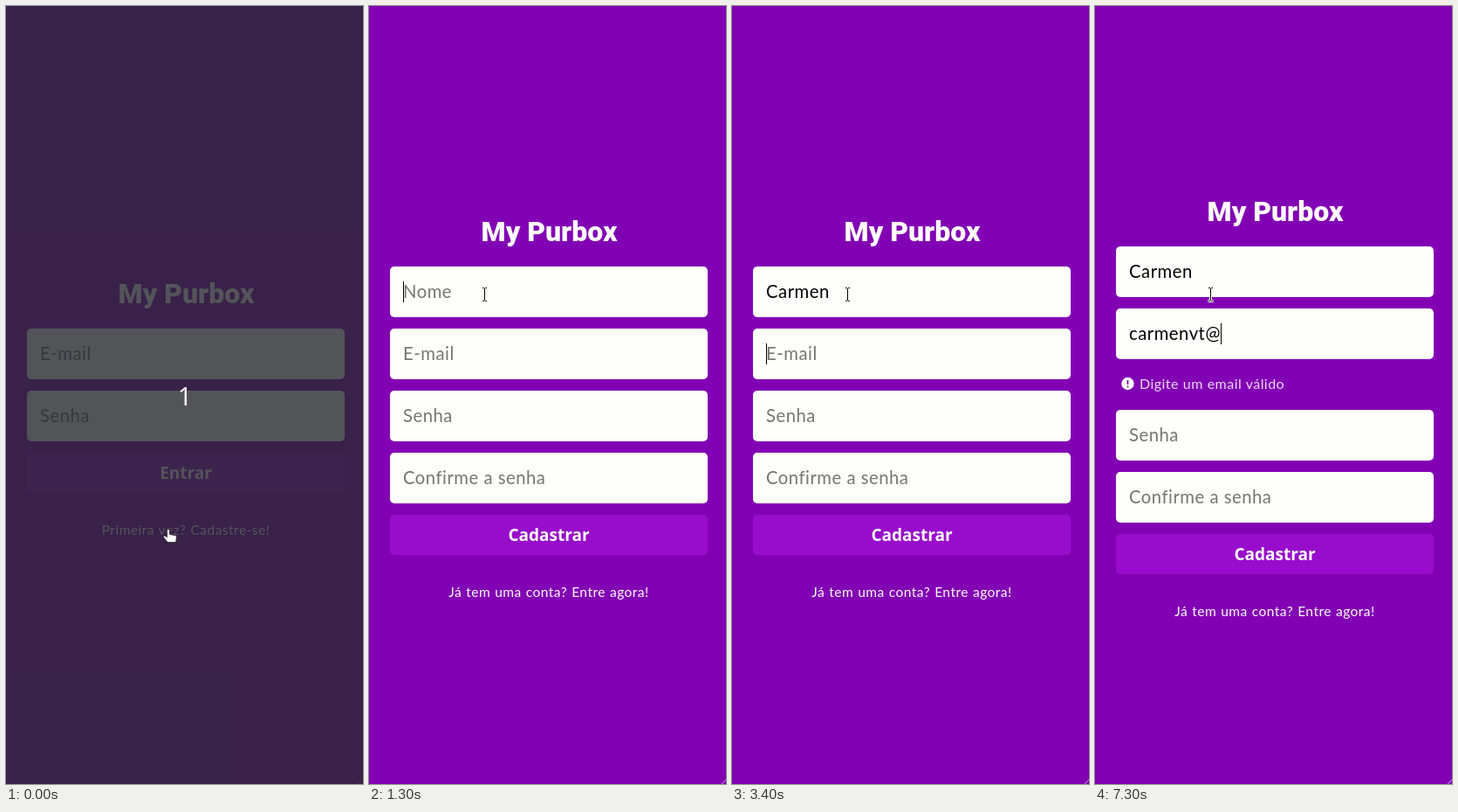
These frames come from a looping animation (409 px wide and 890 px high, 8 s). An HTML page:

```html
<!DOCTYPE html>
<html lang="pt-BR">
<head>
<meta charset="utf-8">
<title>Cadastro</title>
<style>
  html, body { margin: 0; width: 100%; height: 100%; overflow: hidden; background: #8200b4; }
  svg { display: block; width: 100vw; height: 100vh; }
  text { fill: #fff; font-family: Lato, sans-serif; }
  .title { font: 900 32px Roboto, sans-serif; text-anchor: middle; }
  .box { fill: #fefffc; }
  .hint, .typed { font-size: 20.3px; letter-spacing: .5px; }
  .hint { fill: #757575; }
  .typed { fill: #000; }
  .button { fill: #980dcb; }
  .action { font: 700 19px "Noto Sans", sans-serif; text-anchor: middle; }
  .link { font-size: 15.5px; letter-spacing: .48px; word-spacing: .6px; text-anchor: middle; }
  .error { font-size: 16px; letter-spacing: .45px; word-spacing: .4px; fill: #ecdaf4; }
  .count { font: 29px "Noto Sans", sans-serif; text-anchor: middle; fill: #f3edf9; }
  .shade { fill: rgba(39, 42, 48, .8); }
</style>
</head>
<body>
<svg viewBox="0 0 409 890">
  <defs>
    <path id="hand" d="M-.5 6V1.2Q-.5 -.5 1 -.5T2.5 1.2V5.5L9 6.6Q10.6 7 10.4 8.8L9.6 14.5H.2L-4.6 8.6Q-5 7 -3.3 6.9L-.5 8.6Z"
      fill="#fff" stroke="#222" stroke-width=".8"/>
    <path id="arrow" d="M.5 .5V16L4.2 12.6L6.8 18L9.4 16.8L6.9 11.6H11.8Z"
      fill="#111" stroke="#fff"/>
    <g id="beam" fill="none">
      <path d="M-3 -7.5H3M-3 7.5H3M0 -7.5V7.5" stroke="#fff" stroke-width="3"/>
      <path d="M-2.5 -7.5H-.7M.7 -7.5H2.5M-2.5 7.5H-.7M.7 7.5H2.5M0 -7V7" stroke="#000"/>
    </g>
  </defs>
  <rect width="409" height="890" fill="#8200b4"/>
  <g id="screen"></g>
  <rect id="caret" width="1" height="24"/>
  <path d="M404 890L409 885" stroke="#fff" stroke-opacity=".6"/>
  <g id="shade">
    <rect class="shade" width="409" height="890"/>
    <text class="count" x="205" y="457">1</text>
  </g>
  <use id="pointer"/>
</svg>
<script>
const LOOP = 8000;
const $ = id => document.getElementById(id);

const LOGIN = {
  top: 369, hints: ['E-mail', 'Senha'],
  action: 'Entrar', link: 'Primeira vez? Cadastre-se!'
};
const SIGNUP = {
  top: 298, hints: ['Nome', 'E-mail', 'Senha', 'Confirme a senha'],
  action: 'Cadastrar', link: 'Já tem uma conta? Entre agora!',
  errors: ['Digite um nome válido', 'Digite um email válido']
};

// Each entry changes part of the state from its time on.
const steps = [
  [0, { page: LOGIN, values: ['', ''], focus: 0, caret: false, error: -1, shade: true, pointer: ['hand', 185, 599] }],
  [100, { shade: false }],
  [500, { page: SIGNUP, pointer: ['arrow', 185, 599] }],
  [700, { pointer: ['beam', 170, 520] }],
  [800, { pointer: ['beam', 147, 402] }],
  [900, { pointer: ['beam', 134.5, 331] }],
  [1200, { pointer: ['beam', 132.5, 330] }],
  [1300, { caret: true }],
  [2000, { values: ['C', ''], error: 0 }],
  [2200, { values: ['Ca', ''] }],
  [2400, { values: ['Car', ''], error: -1 }],
  [2600, { values: ['Carm', ''] }],
  [2700, { values: ['Carme', ''] }],
  [2800, { values: ['Carmen', ''] }],
  [3400, { focus: 1 }],
  [3800, { values: ['Carmen', 'c'], error: 1 }],
  [4000, { values: ['Carmen', 'ca'] }],
  [4300, { values: ['Carmen', 'car'] }],
  [4400, { values: ['Carmen', 'carme'] }],
  [4500, { values: ['Carmen', 'carmen'] }],
  [5600, { caret: false }],
  [5900, { values: ['Carmen', 'carmenv'], caret: true }],
  [6300, { values: ['Carmen', 'carmenvt'] }],
  [6900, { caret: false }],
  [7300, { values: ['Carmen', 'carmenvt@'], caret: true }]
];

const label = (cls, x, y, str) => `<text class="${cls}" x="${x}" y="${y}">${str}</text>`;
const panel = (cls, y, h) => `<rect class="${cls}" x="24" y="${y}" width="364" height="${h}" rx="5"/>`;

function errorRow(y, str) {
  return `<circle cx="37.5" cy="${y}" r="7.2" fill="#fff"/>
    <path d="M37.5 ${y - 4}V${y + 1}M37.5 ${y + 2.5}V${y + 4.3}" stroke="#8200b4" stroke-width="1.7"/>`
    + label('error', 51, y + 6, str);
}

function draw(s) {
  const { page, values, error } = s;
  let y = page.top - (error < 0 ? 0 : 23);
  let out = label('title', 206.5, y - 29, 'My Purbox');
  let caretY = 0;
  page.hints.forEach((hint, i) => {
    const value = values[i];
    out += panel('box', y, 58) + label(value ? 'typed' : 'hint', 39, y + 36, value || hint);
    if (i === s.focus) caretY = y + 17;
    if (i === error) {
      out += errorRow(y + 86, page.errors[i]);
      y += 45;
    }
    y += 71;
  });
  out += panel('button', y, 46) + label('action', 206, y + 30, page.action)
    + label('link', 206, y + 94, page.link);
  $('screen').innerHTML = out;

  const typed = values[s.focus]
    ? document.querySelectorAll('.typed')[s.focus].getComputedTextLength() : 0;
  $('caret').setAttribute('x', Math.round(39 + typed));
  $('caret').setAttribute('y', caretY);
  $('caret').style.display = s.caret ? '' : 'none';
  $('shade').style.display = s.shade ? '' : 'none';

  const [shape, px, py] = s.pointer;
  $('pointer').setAttribute('href', '#' + shape);
  $('pointer').setAttribute('transform', `translate(${px} ${py})`);
}

const states = [];
steps.forEach(([, change], i) => states.push({ ...states[i - 1], ...change }));

const start = performance.now();
let shown = -1;
function tick() {
  const t = (performance.now() - start) % LOOP;
  const now = steps.filter(([at]) => at <= t).length - 1;
  if (now !== shown) draw(states[shown = now]);
  requestAnimationFrame(tick);
}
tick();
</script>
</body>
</html>
```
